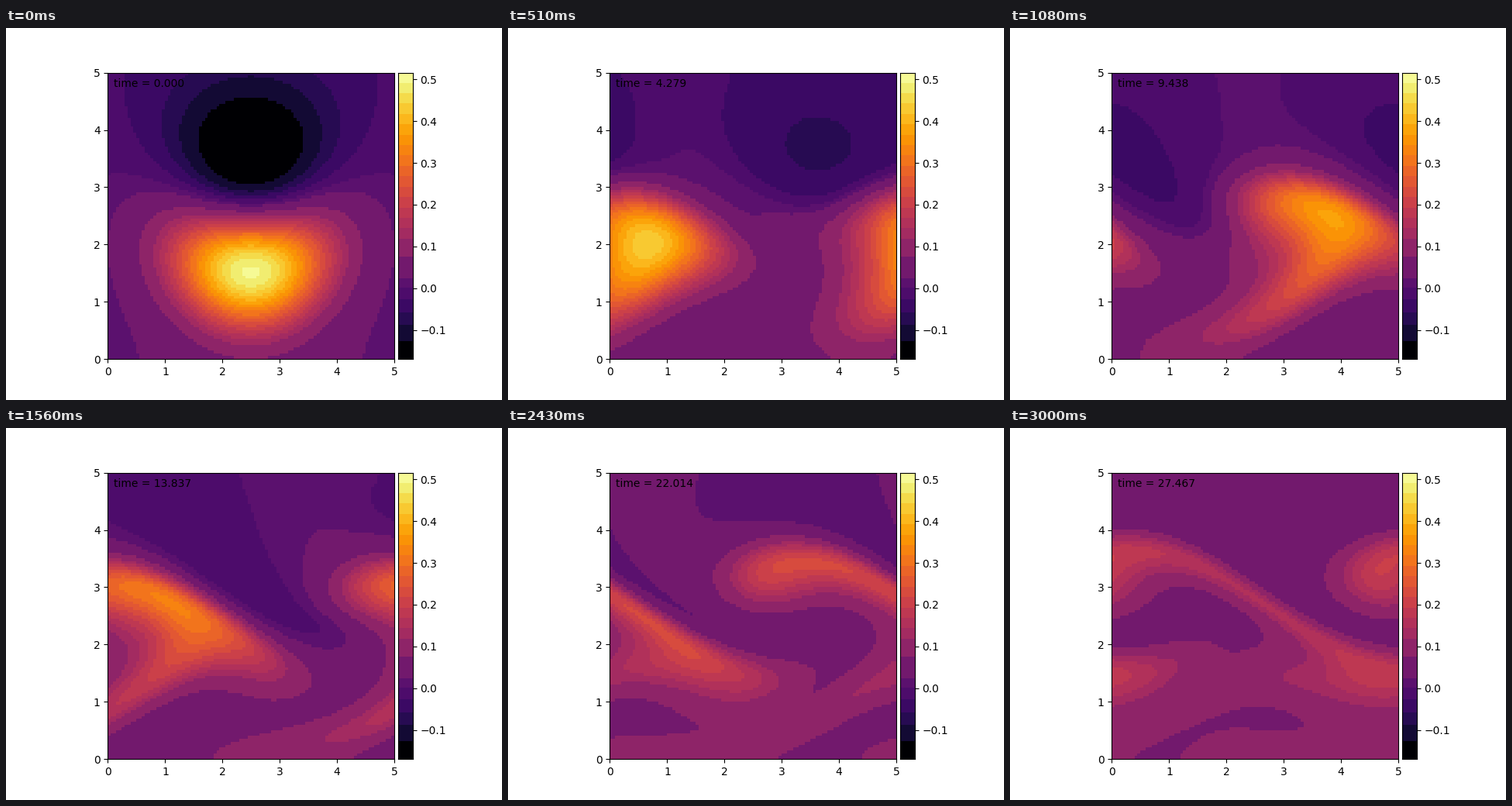
These frames come from a looping animation (640x480 px, 3.03 s). A matplotlib script:

```python
import numpy as np
import matplotlib.pyplot as plt
from matplotlib.animation import FuncAnimation
from matplotlib.colors import BoundaryNorm, ListedColormap

W, H, DPI = 640, 480, 100
FRAMES, INTERVAL = 101, 30
SIZE, CELLS = 5.0, 100
CELL = SIZE / CELLS
VMIN, VMAX = -0.17, 0.5165
K = 2 * np.pi / SIZE

# The clock runs slightly faster as the flow calms down.
clock_fit = np.polyfit([0, 0.17, 0.36, 0.52, 0.64, 0.81, 1],
                       [0, 4.279, 9.438, 13.837, 17.193, 22.014, 27.467], 6)
clock = np.polyval(clock_fit, np.arange(FRAMES) / 100)
clock[0] = 0

mid = (np.arange(CELLS) + 0.5) * CELL
X, Y = np.meshgrid(mid, mid)


def gauss(d, width):
    return np.exp(-0.5 * (d / width) ** 2)


def start():
    """Warm blob below a cool one whose lower side narrows to a tip."""
    dx = X - SIZE / 2
    warm = 0.53 * gauss(dx, 0.97) * gauss(Y - 1.6 - 0.1 * dx ** 2, 0.75)
    cool = 0.22 * gauss(dx, 0.35 + 0.15 * Y) * gauss(Y - 3.4, 1.0)
    return warm - cool + 0.02 - 0.008 * Y


def velocity(x, y, t):
    """Decaying jet plus a travelling wave that rolls it up."""
    jet = np.exp(-((y - 1.8) / np.where(y < 1.8, 1.6, 1.25)) ** 2)
    u = 0.25 + (0.36 + 0.2 * np.exp(-t / 5)) * jet
    centre = 3.78 + 0.41 * t - 3 * np.exp(-t / 3)
    amp = (0.08 + 0.1 * np.exp(-t / 4)) / K
    phase, wall = K * (x - centre), np.pi * y / SIZE
    u = u + amp * np.pi / SIZE * np.cos(phase) * np.cos(wall)
    v = amp * K * np.sin(phase) * np.sin(wall)
    return u, v


def sample(q, x, y):
    """Bilinear lookup, periodic in x and clamped in y."""
    fx = x / CELL - 0.5
    fy = np.clip(y / CELL - 0.5, 0, CELLS - 1.001)
    i, j = np.floor(fx).astype(int), np.floor(fy).astype(int)
    a, b = fx - i, fy - j
    i0, i1 = i % CELLS, (i + 1) % CELLS
    return ((1 - b) * ((1 - a) * q[j, i0] + a * q[j, i1])
            + b * ((1 - a) * q[j + 1, i0] + a * q[j + 1, i1]))


def advance(q, t, dt):
    u, v = velocity(X, Y, t + dt)
    u, v = velocity(X - u * dt / 2, Y - v * dt / 2, t + dt / 2)
    q = sample(q, X - u * dt, Y - v * dt)
    pad = np.pad(q, ((1, 1), (0, 0)), mode="edge")
    spread = (pad[2:] + pad[:-2] + np.roll(q, 1, 1) + np.roll(q, -1, 1) - 4 * q)
    q = q + 0.0015 * dt / CELL ** 2 * spread
    # Everything relaxes to a mild level; deep cold fades quickly.
    return q + dt * (0.03 * (0.1 - q) - 0.35 * np.minimum(q + 0.045, 0))


fields = [start()]
for t0, t1 in zip(clock[:-1], clock[1:]):
    fields.append(advance(fields[-1], t0, t1 - t0))

bounds = np.r_[VMIN, -0.128, -0.088, -0.058, -0.028, 0, 0.022, 0.074,
               np.linspace(0.118, VMAX, 17)]
centres = (bounds[1:] + bounds[:-1]) / 2
colors = plt.get_cmap("inferno")((centres - VMIN) / (VMAX - VMIN))
colors[0] = (0, 0, 0.015, 1)
style = dict(cmap=ListedColormap(colors), norm=BoundaryNorm(bounds, len(colors)),
             origin="lower", interpolation="nearest", aspect="auto")

plt.rcParams["font.family"] = "DejaVu Sans"
fig = plt.figure(figsize=(W / DPI, H / DPI), dpi=DPI, facecolor="white")


def panel(left, width):
    return fig.add_axes([left / W, 0.11, width / W, 0.77])


SIDE = 0.77 * H
LEFT = 80 + (496 - SIDE * 1.05 - 5) / 2
ax = panel(LEFT, SIDE)
image = ax.imshow(fields[0], extent=(0, SIZE, 0, SIZE), **style)
ax.set_xticks(range(6))
ax.set_yticks(range(6))
label = ax.text(0.02, 0.95, "", transform=ax.transAxes, fontsize=10, color="black")

bar = panel(LEFT + SIDE + 5, SIDE * 0.05)
bar.imshow(np.linspace(VMIN, VMAX, 1000)[:, None],
           extent=(0, 1, VMIN, VMAX), **style)
bar.set_xticks([])
bar.yaxis.tick_right()
bar.set_yticks(np.arange(-1, 6) / 10)


def update(n):
    image.set_data(fields[n])
    label.set_text(f"time = {clock[n]:.3f}")
    return image, label


anim = FuncAnimation(fig, update, frames=FRAMES, interval=INTERVAL,
                     repeat=True, repeat_delay=0, blit=False)
plt.show()
```
